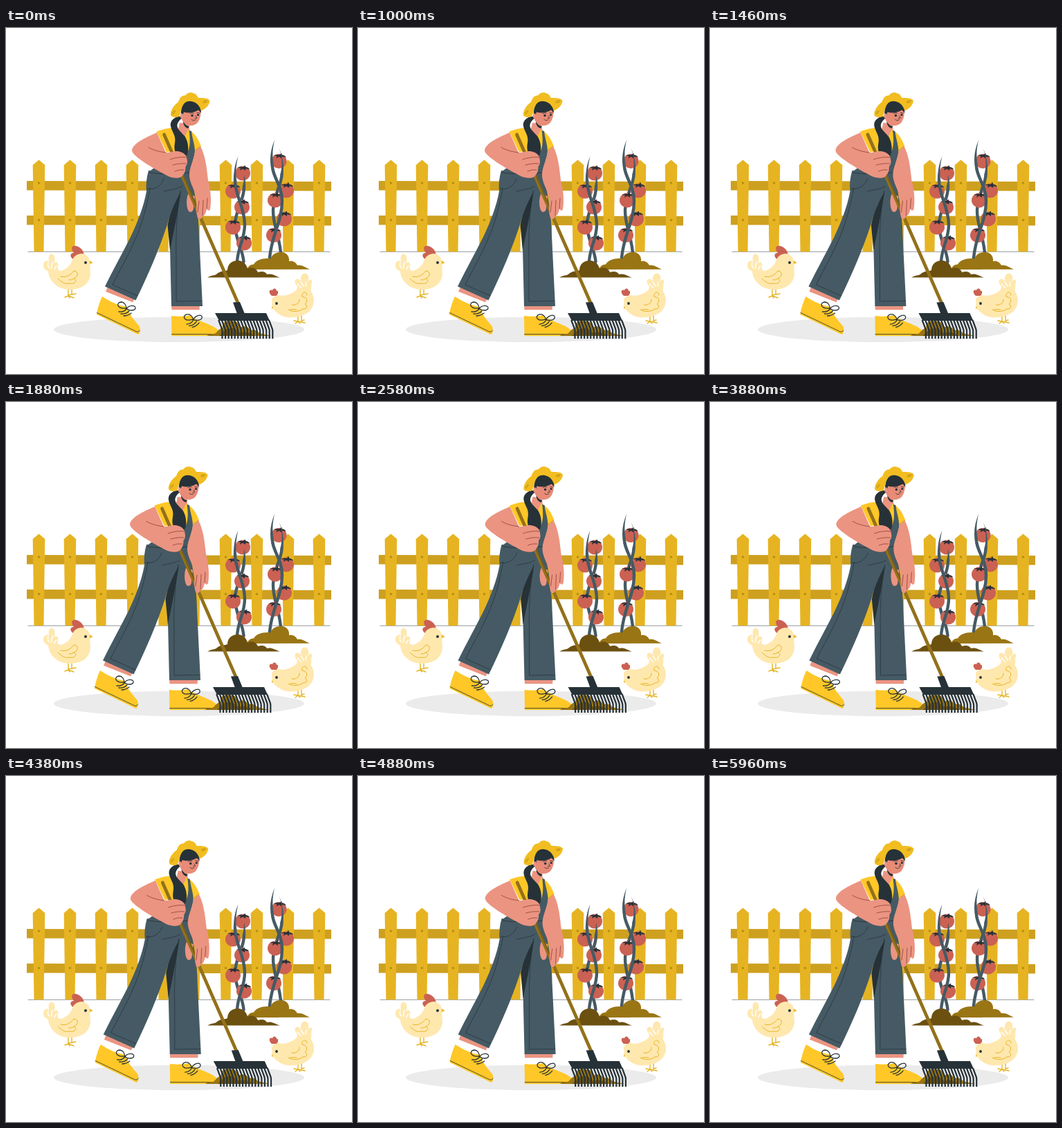
These frames come from a looping animation (500 by 500 pixels, 6 s). An HTML page:

```html
<!DOCTYPE html>
<html lang="en">
<head>
<meta charset="utf-8">
<title>Gardener raking</title>
<style>
  html, body { margin: 0; width: 100%; height: 100%; overflow: hidden; background: #fff; }
  svg { display: block; width: 100vw; height: 100vh; }
  .line { fill: none; stroke: #263238; stroke-width: .8; stroke-linecap: round; stroke-linejoin: round; }
  .dark { fill: #263238; }
  .skin { fill: #eb9481; }
  .denim { fill: #455a64; }
  .yellow { fill: #ffc727; }
  .hat { fill: #f2bd20; }
  .red { fill: #cb6153; }
  .soil { fill: #997514; }
  .soil-dark { fill: #6b5010; }
  .picket { fill: #e6b422; }
  .rail { fill: #cea01f; }
  .hen { fill: #ffe8ae; }
  .gold { fill: none; stroke: #e6b422; stroke-width: 1; stroke-linecap: round; stroke-linejoin: round; }
  .vine { fill: none; stroke: #455a64; stroke-width: 4.4; stroke-linecap: round; }
  .tip { fill: #455a64; }
  .tine { fill: none; stroke: #263238; stroke-width: 2.2; }
</style>
</head>
<body>
<svg viewBox="0 0 500 500">
  <g id="fence">
    <path class="line" d="M32 323.300H468" style="stroke-width:.5"/>
    <path class="rail" d="M30 221L470 222V235.500L30 234.500ZM30 271L470 272V285.500L30 284.500Z"/>
  </g>
  <ellipse cx="250" cy="435.8" rx="181" ry="18.2" fill="#ebebeb"/>

  <g id="plantRight"></g>
  <path class="soil" d="M345 349C351 347 350 342 358 341.500C362 335 372 332 382 333.500C385 326 392 323.500 398 324C406 324 410 331 409 337C415 336 419 339 421 343C428 342 432 346 439 348.800Z"/>
  <g id="plantLeft"></g>
  <path class="soil-dark" d="M291 360.500C297 357 302 358 305 355C311 350 317 352 320 350C320 341 327 335.500 336 336C344 336.500 348 343 349 348C356 344 362 348 364 353C370 351 375 352 377 356C384 354 388 358 396 360.500Z"/>

  <!-- hens -->
  <g>
    <path class="gold" d="M90 377V387M95 377V385M85 389L90 387L98 390M90 386L101 384M90 387L92 390" style="stroke-width:1.4"/>
    <path class="red" d="M97 334C92 331 92 325 98 325C93 319 95 314 101 315C107 316 112 321 112.500 327C106 325 100 329 97 334Z"/>
    <path d="M119 335L125.500 339L120 342Z" fill="#e6b422"/>
    <path class="hen" d="M97 333C102 324 116 324 120 333C122 339 121 346 122 354C122 369 110 378 92 378C75 378 62 366 61 351.500C54 350 52 341 56 338C58 336 61 336 62.500 338C60 330 63 326 67 327C71 328 71 335 70 340C74 336 77 341 74.500 347C75 351 78 351.500 81 350.500C90 347 94 341 97 333Z"/>
    <path d="M61 339Q59 344 63 347M68 338Q65 342 66 347M73 344Q70 346 70 349" fill="none" stroke="#fff" stroke-width="1.5" stroke-linecap="round"/>
    <path class="gold" d="M79 359C86 361 93 358 98 351C105 351 105 360 98 362C104 365 99 371 92 369C85 371 79 366 75 362M91 364Q95 365 98 362"/>
    <circle class="dark" cx="115" cy="339" r="2"/>
  </g>
  <g>
    <path class="gold" d="M422 415V424M427 414V424M416 423L422 424L432 426M422 424L418 427M427 423L431 422M422 424L425 427" style="stroke-width:1.4"/>
    <path class="red" d="M384 387C379 383 380 377 385 379C386 375 391 376 391 380C394 379 394 384 391 387Z"/>
    <path d="M385 399L384 406L390 403Z" fill="#e6b422"/>
    <path class="hen" d="M384 394C384 387 393 385 400 387C408 386 417 382 420 378C422 374 420 373 418 369C416 362 422 360 426 366C425 358 429 353 434 355C438 358 438 363 436 367C441 360 444 365 441 371C442 375 440 378 441 381C447 390 447 404 435 412C423 420 406 420 397 415C390 411 386 407 385 402Z"/>
    <path d="M426 367L430 373M434 367L433 373M421 370L426 375" fill="none" stroke="#fff" stroke-width="1.5" stroke-linecap="round"/>
    <path class="gold" d="M408 407C415 411 424 410 429 406C436 406 436 401 432 399C437 395 435 389 428 388C427 382 434 379 435 386M413 400C419 402 425 396 424 392M411 407Q416 406 420 407"/>
    <circle class="dark" cx="391" cy="398" r="1.900"/>
  </g>

  <g id="gardener">
    <!-- feet -->
    <path class="skin" d="M147 374L186 391L183 396.500L144 381ZM239 401H280L279.500 407.500H239.500Z"/>
    <path d="M144 381L183 396.500L177 405L139 390ZM239.500 407.500H279L267 418H239.500Z" fill="#fff"/>
    <path class="yellow" d="M139 388C135 396 132 407 131 414L190 442.500C194 444 195 434 192 430C185 422 178 414 175 403C163 401 151 396 139 388ZM239 416C248 417 258 417 266 415C277 424 298 428 306 436C310 441 309 445 305 445H239.500Z"/>
    <path class="line" d="M131.500 411.500L189 439Q192 440 193.500 437M239.500 442.500H307"/>
    <g id="lace" class="line" style="stroke-width:1.3">
      <path d="M173 405C160 406 159 397 166 396C172 396 174 402 174 406C177 400 188 400 187 405C186 409 178 409 173 405M163 410Q170 411 174 406M166 413Q173 414 178 409M170 416Q176 416 181 412"/>
    </g>
    <use href="#lace" transform="translate(103 -21) rotate(-13 170 430) translate(-9 36)"/>

    <!-- trousers -->
    <path class="denim" d="M250 209L267 209C272 235 279 270 279 300L284 402H239L237 318C235 272 236 245 250 209Z"/>
    <path class="dark" d="M254 228C246 244 237 266 233.500 285L237 322C241 300 248 270 254 228Z"/>
    <path class="denim" d="M206 206C203 216 202 226 203 236C199 258 190 281 180 302C168 326 155 349 143 373.500L187.500 393.500C206 356 222 318 233 284C239 262 247 246 256 231L265 210Z"/>
    <path class="line" d="M204 232C214 235 225 228 228 218M208 231C204 256 196 286 186 307C176 331 163 352 154 371L190 387M228 236C236 234 247 233 254 229M252 235C247 262 245 300 246 330V395L283 394.500" style="stroke-width:.7"/>

    <!-- torso -->
    <path class="skin" d="M251 137L264 138L266 153L258 165L248 150Z"/>
    <path class="yellow" d="M217.500 149.500C228 146 239 143 248 145L258 158L263 147C274 152 278 161 282 171L273 178L266 208H241L238 178L232 179.500Z"/>
    <path class="denim" d="M264.500 148L268 149C269 160 273 168 273 179C272 190 266 198 267 211L206 208L239 184L258 184C266 179 267 164 264.500 148Z"/>
    <path class="line" d="M207 209Q235 213 265 209"/>
    <path class="line" d="M273 177L281 171" style="stroke:#b78a12"/>

    <!-- head -->
    <path d="M253 121C252 128 254 134 258 138C264 143 274 142 278 135C282 128 282 121 280 114L263 110Z" fill="#e88b77"/>
    <path class="dark" d="M256 135C259 140 262 142 265 142L263 145C259 144 256 140 256 135Z"/>
    <path class="dark" d="M253 126C252 112 258 104 268 104.500C277 105 282 111 282 123C281 122 280 120 278 118.500C271 123 263 123 257 121.500C256 123 256 126 255 129Z"/>
    <path class="dark" d="M255 128C246 126 236 133 238 142C240 151 246 155 244 166C242 178 245 186 258 188C266 182 264 164 258 156C252 149 244 144 249 136C251 132 254 132 255 128Z"/>
    <ellipse class="skin" cx="254" cy="127" rx="2.200" ry="3.500"/>
    <path class="hat" d="M238 126C237 119 244 110 249 107C251 101 254 97 259 97.500C262 93 268 92 271 94.500C275 95 276 98 278 101C285 101 292 101 294.500 105C294 112 288 117 282 119.500C279 108 268 103 260 107C253 111 253 123 250 128C245 130 239 129 238 126Z"/>
    <path class="line" d="M240 123L244 119M241 125L245 120M285 106L291 105M285 108L290 107" style="stroke:#9f7a12;stroke-width:.7"/>
    <g class="dark"><circle cx="269" cy="126.500" r="1.700"/><circle cx="277.500" cy="125.500" r="1.600"/></g>
    <path class="line" d="M266 123.500Q268 122 271 123M276 122.500L280 123M274 127L276 130L273 130.500M268 132Q270 135 274 132.500"/>

    <!-- rake -->
    <path class="soil" d="M290 445C295 441 300 444 304 440C307 436 310 434 313 433C312 426 320 421 326 424C333 422 337 428 338 433C345 429 351 432 353 437C359 435 364 438 366 441L383 445Z"/>
    <path class="soil-dark" d="M308 445C314 440 316 434 324 434C331 432 334 438 339 441C346 437 353 441 360 445Z"/>
    <path class="skin" d="M263 240C260 248 261 258 263 263C265 268 271 266 271 260L273 243Z"/>
    <path d="M228.500 154L335.500 398" fill="none" stroke="#93711a" stroke-width="4.700" stroke-linecap="round"/>
    <path d="M255 211L279 266" fill="none" stroke="#6b5010" stroke-width="1"/>
    <path class="dark" d="M328 396.500L338 396L345 413H334Z"/>
    <path class="dark" d="M302 412H376L381 423H308Z"/>
    <g id="tines"></g>

    <!-- arms -->
    <path class="skin" d="M273 178L281 171C288 184 290 201 292 220C296 235 297 250 295 262C293.500 265 291 264 290 261C289 268 287 271 284 272C282 277 278 278 276.500 273C274 263 276 254 275 246C273 233 264 223 265 210C266 199 272 190 273 178Z"/>
    <path class="line" d="M284 271L285 249M290 261L291 246M277 266L279 250" style="stroke:#8d4038"/>
    <path class="skin" d="M218 151C205 157 183 166 182 177C182 185 213 203 234 214C243 218 253 218 256 212C259 209 259.500 204 259.500 200C262 198 262.500 193 261.500 190C262 185 258 181 252 179C245 176 235 181 231 180Z"/>
    <path class="line" d="M206 172.500C213 177 223 179 231 180M237 190C245 187 254 186 261 187M241 198Q252 195 260 196M244 207Q251 204 257 205" style="stroke:#8d4038"/>
  </g>
</svg>
<script>
const byId = id => document.getElementById(id);
const add = (id, markup) => byId(id).insertAdjacentHTML('beforeend', markup);
const path = (cls, d) => `<path class="${cls}" d="${d}"/>`;

for (let i = 0; i < 10; i++) {
  const x = 47.5 + 45 * i;
  const nail = y => `<circle cx="${x}" cy="${y}" r="1.8" fill="#b78f10"/>`;
  add('fence', path('picket', `M${x} 190.500l8.800 7.500l-1.800 125.300h-14l-1.800 -125.300Z`) + nail(224) + nail(277.500));
}

for (let i = 0; i < 17; i++) {
  add('tines', path('tine', `M${307.2 + i * 4.550} 422l4.500 12q.8 2 .8 4v11`));
}

const tomato = ([x, y]) => `<g transform="translate(${x} ${y})">
  <ellipse class="red" rx="11" ry="10.500"/>
  <path class="dark" d="M-8 -8Q-3 -10.500 0 -9L4 -11.500L4 -9Q9 -9 10 -5.500Q6 -7 4 -6.500L4 -4L0 -6.500L-4 -4L-3 -7.500Z"/></g>`;

const grow = (id, back, front, tomatoes, tips) =>
  add(id, path('vine', back) + tomatoes.map(tomato).join('') + path('vine', front) + path('tip', tips));

// Tips are slender filled tapers that meet the full width of the vine.
grow('plantRight',
  'M398.500 212C398 228 386 242 386 264C386 288 397 304 397.500 332',
  'M385.500 204C388 218 399 230 399 250C399 280 384 298 381 332',
  [[394.5, 192.5], [405, 235], [389, 249], [402, 276], [387, 299.5]],
  'M388.500 161C384 176 385 190 387.700 203.500L383.400 204.500C380.500 190 382 176 388.500 161ZM394.500 173.500C401 187 401.500 200 400.700 212H396.300C399.500 200 400 187 394.500 173.500Z');
grow('plantLeft',
  'M344 230C344 250 331 264 331 284C331 306 342 318 343.500 338',
  'M331 220C331 242 345 260 345 284C345 306 335 316 334 338',
  [[342, 210], [328, 236], [341, 259], [328, 288], [344, 311]],
  'M335.500 185.500C332 199 332 210 333.200 220H328.800C329 208 330.500 197 335.500 185.500ZM344 212Q346.500 222 346.200 230H341.800Q344 222 344 212Z');

// Horizontal shake: one offset per tenth of the loop, joined linearly.
const LOOP = 6000, FPS = 24;
const offsets = [0, -1, 2, -4, 4, -4, 4, -4, 2, -1, 0];

function shake(ms) {
  const pos = ms / LOOP * 10, i = Math.floor(pos);
  return offsets[i] + (offsets[i + 1] - offsets[i]) * (pos - i);
}

function draw() {
  const t = performance.now() % LOOP;
  const step = Math.floor((t + 4) * FPS / 1000) % (LOOP / 1000 * FPS);
  byId('gardener').setAttribute('transform', `translate(${shake(step * 1000 / FPS).toFixed(3)} 0)`);
  requestAnimationFrame(draw);
}
draw();
</script>
</body>
</html>
```
